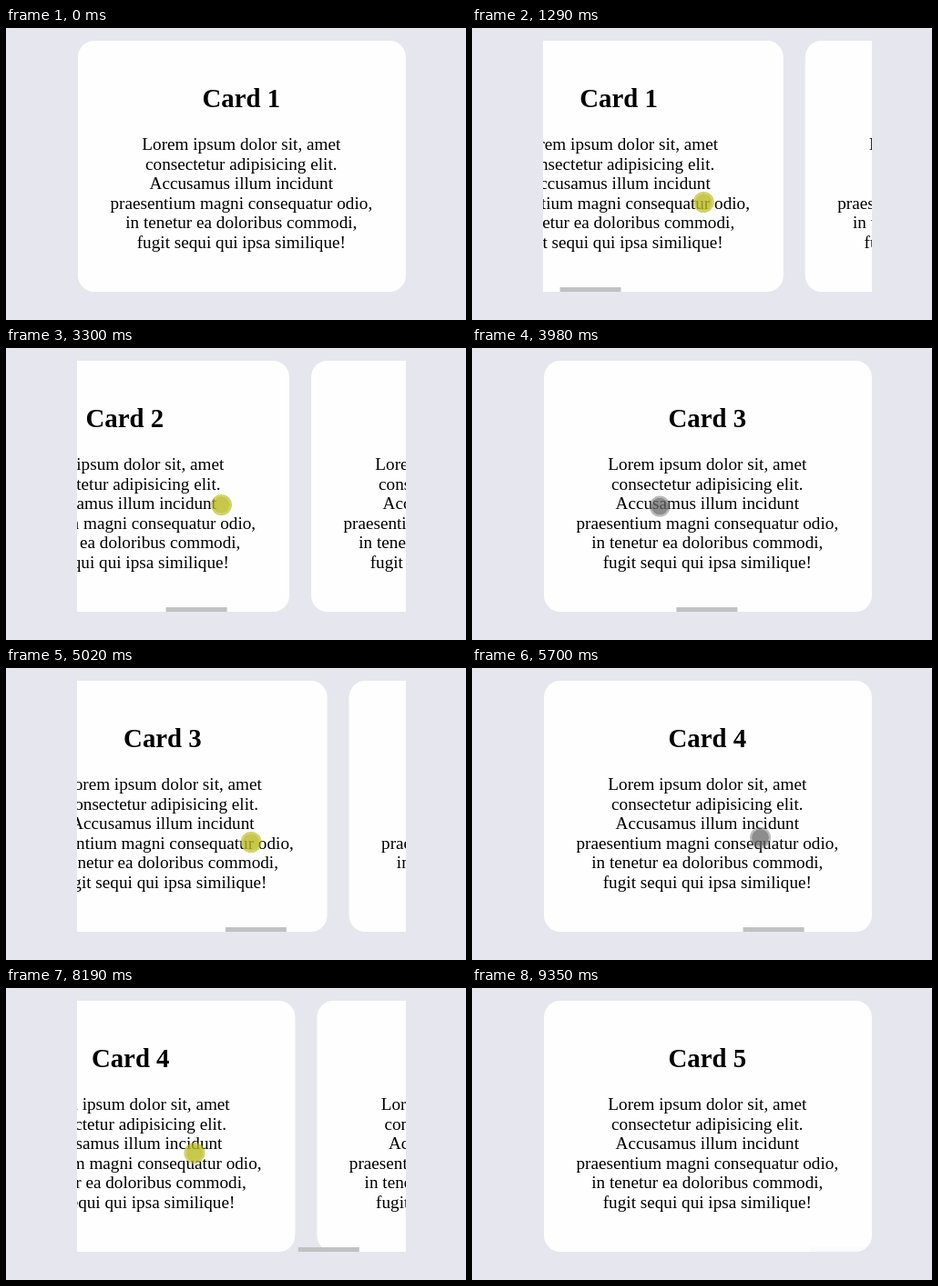
Recreate the animation shown at these times as an HTML page. Size 505x321 px, loop 9680 ms.

```html
<!DOCTYPE html>
<html lang="en">
<head>
<meta charset="utf-8">
<title>Card carousel</title>
<style>
  html, body { margin: 0; width: 100%; height: 100%; overflow: hidden; background: #e6e6ef; }
  body { position: relative; font-family: "Liberation Serif", "Times New Roman", serif; color: #000; }

  .viewport { position: absolute; left: 78px; top: 14px; width: 361px; height: 276px; overflow: hidden; }
  .track { position: absolute; left: 1px; top: 0; display: flex; gap: 24px; }
  .card {
    flex: none; position: relative; width: 360px; height: 276px;
    border-radius: 18px; background: #fefefe; text-align: center; white-space: nowrap;
  }
  .card h2, .card p { position: absolute; left: -.7px; width: 100%; margin: 0; }
  .card h2 { top: 47.4px; font-size: 28.8px; line-height: 32.4px; }
  .card p { top: 103.1px; font-size: 19.2px; line-height: 21.6px; }

  .thumb { position: absolute; left: 0; bottom: 0; width: 67px; height: 5px; background: #c1c1c1; }

  .cursor {
    position: absolute; left: -11.5px; top: -11.5px; width: 19px; height: 19px;
    border: 2px solid rgba(120, 120, 120, .5); border-radius: 50%;
    background: rgba(100, 100, 100, .74) padding-box;
  }
  .cursor.down { border-color: rgba(186, 186, 30, .65); background-color: rgba(186, 186, 30, .8); }
</style>
</head>
<body>
<div class="viewport">
  <div class="track"></div>
  <div class="thumb"></div>
</div>
<div class="cursor"></div>

<script>
const LOOP = 9680;
const STEP = 68.75, FIRST_STEP = 190, STEPS = 133;
const PAGE = 384, THUMB_PAGE = 73.2;
const SLOP = 5;
const SETTLE = 250;
const FADE_DELAY = 640, FADE = 195;
const CURSOR_SHOWN = [185, 8850];

const ENTRY = { x: 410, y: 288 };
const EXIT = { glide: [8540, 8810], x: 190, y: 280 };

// Glide to (x, y), pull left by `travel`, then snap by `pages`.
const drags = [
  { glide: [190, 670],   x: 356, y: 191, pull: [830, 1730],  travel: 200, pages: 1 },
  { glide: [1780, 2115], x: 369, y: 172, pull: [2630, 3500], travel: 177, pages: 1 },
  { glide: [3800, 4400], x: 360, y: 191, pull: [4600, 5080], travel: 109, pages: 1 },
  { glide: [5400, 5830], x: 394, y: 180, pull: [6050, 6880], travel: 165, pages: 0 },
  { glide: [7280, 7460], x: 333, y: 181, pull: [7570, 8510], travel: 200, pages: 1 }
];

const lines = [
  'Lorem ipsum dolor sit, amet',
  'consectetur adipisicing elit.',
  'Accusamus illum incidunt',
  'praesentium magni consequatur odio,',
  'in tenetur ea doloribus commodi,',
  'fugit sequi qui ipsa similique!'
];

const $ = (selector) => document.querySelector(selector);
const track = $('.track'), thumb = $('.thumb'), cursor = $('.cursor');
for (let n = 1; n <= 5; n++) {
  track.insertAdjacentHTML('beforeend',
    `<div class="card"><h2>Card ${n}</h2><p>${lines.join('<br>')}</p></div>`);
}

const within = (t, [from, to]) => t >= from && t < to;
const progress = (t, [from, to]) => Math.min(1, Math.max(0, (t - from) / (to - from)));
const mix = (a, b, p) => a + (b - a) * p;
const easeIn = (p) => p * p;
const easeOut = (p) => 1 - (1 - p) ** 3;

function glide(point, stop, t) {
  const p = easeIn(progress(t, stop.glide));
  point.x = mix(point.x, stop.x, p);
  point.y = mix(point.y, stop.y, p);
}

function poseAt(t) {
  const point = { ...ENTRY };
  let scroll = 0, bar = 0;
  for (const drag of drags) {
    const [press, release] = drag.pull;
    glide(point, drag, t);
    const travel = drag.travel * progress(t, drag.pull);
    point.x -= travel;

    const settled = easeOut(progress(t, [release, release + SETTLE]));
    scroll += mix(Math.max(0, travel - SLOP), drag.pages * PAGE, settled);

    const fadeStart = release + FADE_DELAY;
    if (t > press) bar = 1 - progress(t, [fadeStart, fadeStart + FADE]);
  }
  glide(point, EXIT, t);
  return { point, scroll, bar, down: drags.some((drag) => within(t, drag.pull)) };
}

// The picture advances in fixed steps between an opening and a closing hold.
function quantise(t) {
  if (t < FIRST_STEP) return 0;
  return FIRST_STEP + Math.min(STEPS, Math.floor((t - FIRST_STEP) / STEP)) * STEP;
}

function show(time) {
  const t = quantise(time % LOOP);
  const { point, scroll, bar, down } = poseAt(t);
  track.style.transform = `translateX(${-scroll}px)`;
  thumb.style.transform = `translateX(${scroll / PAGE * THUMB_PAGE}px)`;
  thumb.style.opacity = bar;
  cursor.style.transform = `translate(${point.x}px, ${point.y}px)`;
  cursor.style.opacity = Number(within(t, CURSOR_SHOWN));
  cursor.classList.toggle('down', down);
}

const start = performance.now();
function tick() {
  show(performance.now() - start);
  requestAnimationFrame(tick);
}
tick();
</script>
</body>
</html>
```
